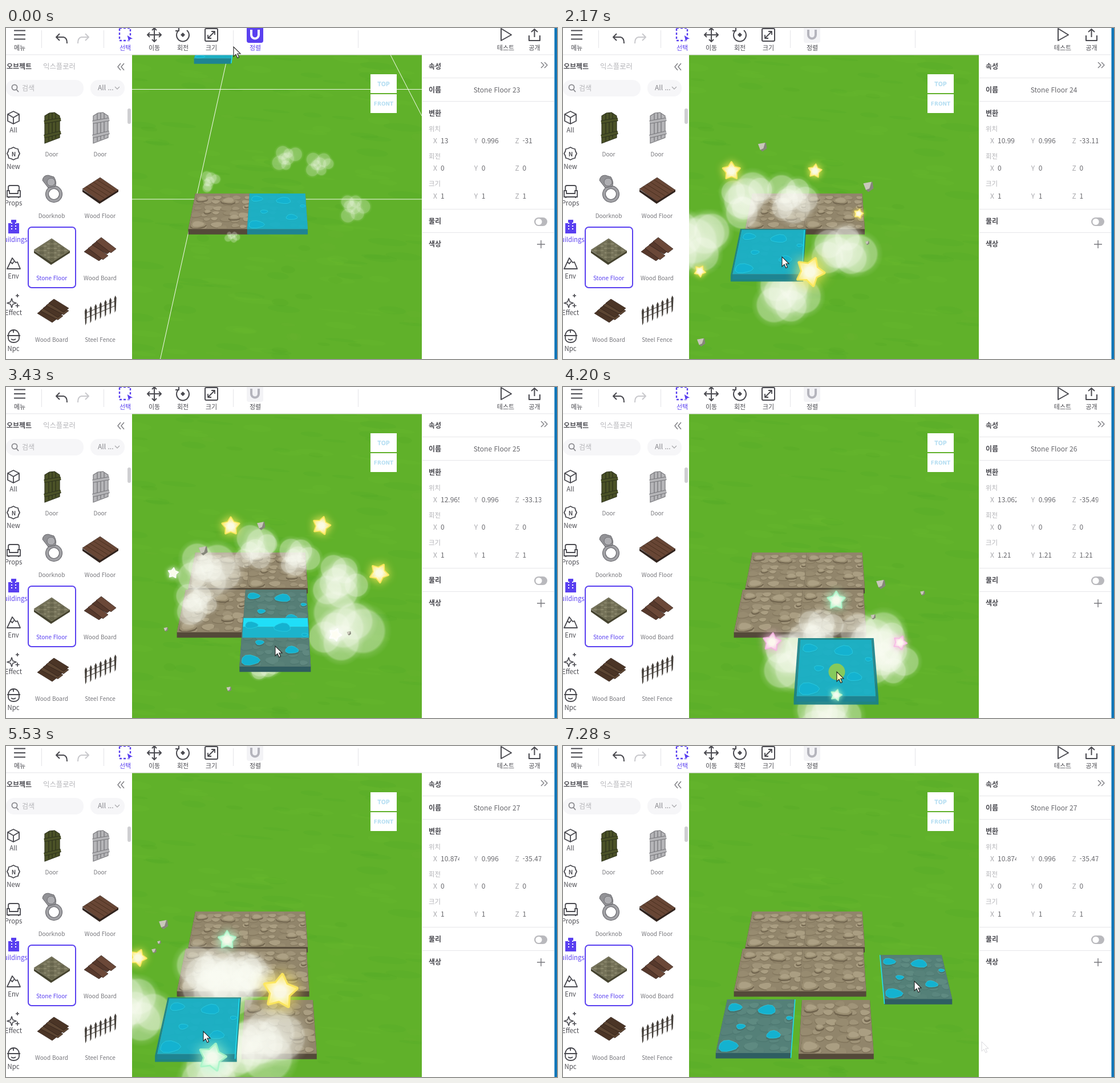
An HTML page with a canvas that plays this animation: 966 px wide and 580 px high, repeating every 7350 ms.

```html
<!DOCTYPE html>
<html lang="ko">
<head>
<meta charset="utf-8">
<title>Stone floor placement</title>
<style>
html,body{margin:0;width:966px;height:580px;overflow:hidden;background:#fff}
canvas,svg{position:absolute;left:0;top:0}
text{font-family:"Noto Sans CJK KR","Noto Sans",sans-serif;white-space:pre}
</style>
</head>
<body>
<canvas id="scene" width="966" height="580"></canvas>
<svg id="ui" width="966" height="580" viewBox="0 0 966 580"></svg>
<script>
const LOOP = 7350, STEP = 70, ALIGN_OFF = 210;
const PURPLE = '#5a40f0', DARK = '#4a4a50', GREY = '#b4b4b8';
const ctx = document.getElementById('scene').getContext('2d');
const ui = document.getElementById('ui');

let seed = 7;
const rnd = () => (seed = seed * 16807 % 2147483647) / 2147483647;
const between = (a, b) => a + rnd() * (b - a);
const mix = (a, b, k) => a + (b - a) * k;
const clamp = n => Math.max(0, Math.min(1, n));
const repeat = (n, make) => Array.from({ length: n }, (_, i) => make(i));

// ---------- interface ----------
const out = [];
const add = s => out.push(s);
const rect = (x, y, w, h, fill, more = '') => add(`<rect x="${x}" y="${y}" width="${w}" height="${h}" fill="${fill}" ${more}/>`);
const line = (d, color = DARK, w = 2) => add(`<path d="${d}" fill="none" stroke="${color}" stroke-width="${w}" stroke-linejoin="round"/>`);
const shape = (d, fill, more = '') => add(`<path d="${d}" fill="${fill}" ${more}/>`);
const label = (x, y, s, size, fill = DARK, weight = 500, anchor = 'middle', more = '') =>
  add(`<text x="${x}" y="${y}" font-size="${size}" fill="${fill}" font-weight="${weight}" text-anchor="${anchor}" ${more}>${s}</text>`);

function toolbar() {
  rect(0, 0, 966, 47, '#fff');
  rect(0, 46.5, 961, 1, '#dcdce0');
  for (const x of [62, 171, 398, 617]) rect(x, 4, 1, 31, '#e4e4e8');
  line('M14 4.5H34M14 12H34M14 19.5H34');
  line('M94 10L88 16L94 22M88 16H101Q107 17 107 27');
  line('M139 10L145 16L139 22M145 16H132Q126 17 126 27', '#c9c9cd');
  rect(199, 0, 19, 22, 'none', `stroke="${PURPLE}" stroke-width="2.4" stroke-dasharray="4 3"`);
  shape('M212 12L223 19L218 20L215 25Z', PURPLE, 'stroke="#fff" stroke-width="1"');
  line('M260 0V24M248 12H272M256 4L260 0L264 4M256 20L260 24L264 20M252 8L248 12L252 16M268 8L272 12L268 16');
  line('M303 4A11 11 0 1 0 317 4M303 -1V5H297');
  shape('M310 8L314 12L310 16L306 12Z', DARK);
  rect(349, 1, 22, 22, 'none', `rx="2" stroke="${DARK}" stroke-width="2"`);
  line('M354 18L366 6M360 6H366V12M354 12V18H360', DARK, 1.8);
  add('<rect id="alignBox" x="422" y="-4" width="29" height="30" rx="4"/>');
  add('<path id="magnet" d="M430 3V12A6.5 6.5 0 0 0 443 12V3" fill="none" stroke-width="4"/>');
  [['메뉴', 24], ['이동', 260], ['회전', 310], ['크기', 360], ['테스트', 876], ['공개', 926.5]].forEach(([s, x]) => label(x, 39, s, 11));
  label(209, 39, '선택', 11, PURPLE);
  label(437, 39, '정렬', 11, DARK, 500, 'middle', 'id="alignText"');
  line('M868 1V22L886 12Z');
  line('M917 13V22H936V13M926.5 16V2M921 7L926.5 2L932 7');
}

function plank(x, y, w, h, c) {
  shape(`M${x} ${y}l${w} ${h}l9 -7l${-w} ${-h}z`, c, 'stroke="#2b1e18" stroke-width=".7"');
}
function slab(x, y, top, side) {
  shape(`M${x - 31} ${y}l30 20l33 -20v4l-33 21l-30 -21z`, side);
  shape(`M${x - 31} ${y - 1}l31 -20l32 22l-32 20z`, top, `stroke="${side}" stroke-width=".6"`);
}
function door(x, c, dark) {
  shape(`M${x - 13} 154l8 -5l9 -1l9 6v38l-26 10z`, c, `stroke="${dark}" stroke-width="1.2"`);
  line(`M${x - 6} 150V198M${x} 148V196M${x + 6} 150V193`, dark, 1.3);
  for (const [color, w] of [[dark, 6], [c, 4]]) line(`M${x - 14} 165l29 -5M${x - 14} 190l29 -7`, color, w);
}

function thumbnails() {
  door(81, '#4b5227', '#2d321c');
  door(166, '#b5b5b8', '#77777b');
  for (const [color, w] of [['#5c5c61', 6], ['#a2a2a6', 4]]) add(`<circle cx="84" cy="291" r="12" fill="none" stroke="${color}" stroke-width="${w}"/>`);
  shape('M64 267Q65 258 74 258L84 261Q90 271 86 278L74 280Z', '#929296', 'stroke="#66666a"');
  add('<circle cx="79" cy="270" r="7" fill="#aeaeb2" stroke="#707074"/>');
  slab(165, 283, '#684635', '#30231d');
  for (let i = 1; i < 5; i++) line(`M${134 + i * 6.4} ${282 - i * 4}l32 20`, '#49301f', 1);
  slab(80, 390, '#78755b', '#45432f');
  for (let i = 0; i < 25; i++) {
    const u = i % 5 - 2, v = (i / 5 | 0) - 2;
    add(`<ellipse cx="${80.5 + (u - v) * 6}" cy="${390 + (u + v) * 3.9}" rx="${between(2.6, 4)}" ry="2.2" fill="${i % 3 ? '#88856a' : '#68664e'}" stroke="#5b5843" stroke-width=".5"/>`);
  }
  for (let i = 0; i < 4; i++) plank(137 + i * 7, 392 - i * 6, 26, 16 + i % 2 * 4, i % 2 ? '#6b4838' : '#57392c');
  for (let i = 0; i < 5; i++) plank(55 + i * 5, 500 - i * 4.5, 26 + i % 2 * 5, 16, i % 2 ? '#5c4532' : '#4b3526');
  line('M138 500L193 478M138 509L193 486', '#57514b', 1.3);
  for (let i = 0; i < 7; i++) shape(`M${138 + i * 8.6} ${496 - i * 3.7}l2 -5l2 4l-1 22l-2 4z`, '#46413c');
}

function leftPanel() {
  rect(0, 47.5, 221, 533, '#fff');
  label(1, 72, '오브젝트', 12, DARK, 700, 'start');
  label(65, 72, '익스플로러', 12.4, GREY, 500, 'start');
  line('M201 62L196 68L201 74M207 62L202 68L207 74', '#77777c', 1.3);
  rect(0, 91, 136, 29, '#f6f6f8', 'rx="14"');
  rect(148, 91, 60, 29, '#f6f6f8', 'rx="14"');
  add('<circle cx="15" cy="104" r="4.6" fill="none" stroke="#88888d" stroke-width="1.8"/>');
  line('M18.5 108L22 112', '#88888d', 1.8);
  label(28, 109.5, '검색', 12, GREY, 500, 'start');
  label(161, 109, 'All ...', 12, '#85858a', 500, 'start');
  line('M191 103L195 107L199 103', '#aaaaae', 1.3);
  rect(213, 141, 6, 27, '#cfcfd2', 'rx="3"');

  ['All', 'New', 'Props', 'Buildings', 'Env', 'Effect', 'Npc'].forEach((s, i) =>
    label(13, 183 + i * 63.9, s, 11.3, i === 3 ? PURPLE : DARK));
  line('M13 146L23 151V163L13 168L3 163V151ZM3 151L13 157L23 151M13 157V168', DARK, 1.8);
  line('M13 209l4 2l4 1l1 4l2 4l-2 4l-1 4l-4 1l-4 2l-4 -2l-4 -1l-1 -4l-2 -4l2 -4l1 -4l4 -1z', DARK, 1.8);
  label(13.5, 224.5, 'N', 10, DARK, 700);
  line('M4 285V279Q4 276 7 276H20Q23 276 23 279V285M2 285H6V290H21V285H25V296H2ZM5 296V298M22 296V298', DARK, 1.8);
  shape('M4 360V342H9V336H18V342H23V360Z', PURPLE);
  for (const y of [342, 347, 352]) line(`M9 ${y}H11M16 ${y}H18`, '#fff', 1.8);
  line('M2 422L11 403L17 411L20 410L25 422ZM8 410L11 413L14 409', DARK, 1.8);
  line('M10 474l2 6l6 2l-6 2l-2 6l-2 -6l-6 -2l6 -2zM20 466v6M17 469h6M20 483v7M16.5 486.5h7', DARK, 1.6);
  line('M4 539A9.5 10 0 0 1 23 539V544A9.5 7 0 0 1 4 544ZM2 539H25M9 545Q13 548 17 545M13 529V534', DARK, 1.8);

  rect(39, 349, 83, 106, '#fff', `rx="6" stroke="${PURPLE}" stroke-width="2"`);
  ['Door', 'Door', 'Doorknob', 'Wood Floor', 'Stone Floor', 'Wood Board', 'Wood Board', 'Steel Fence'].forEach((s, i) =>
    label(i % 2 ? 165 : 80, 225 + (i >> 1) * 108.3, s, 10, i === 4 ? PURPLE : '#77777c'));
  thumbnails();
}

function rightPanel() {
  rect(729, 47.5, 233, 533, '#fff');
  rect(961.5, 0, 5, 580, '#0f75b8');
  for (const y of [87, 128, 317, 358]) rect(730, y, 231, 1, '#e6e6e9');
  [['속성', 72], ['이름', 113], ['변환', 154], ['물리', 343], ['색상', 383]].forEach(([s, y]) => label(741, y, s, 12, DARK, 600, 'start'));
  line('M938 60L943 65L938 70M944 60L949 65L944 70', '#77777c', 1.3);
  label(860.5, 113, '', 12, '#66666b', 500, 'middle', 'id="name"');
  ['위치', '회전', '크기'].forEach((s, r) => {
    const y = 180.5 + r * 48.3;
    label(741, y, s, 11.5, GREY, 500, 'start');
    ['X', 'Y', 'Z'].forEach((axis, c) => {
      const x = 749 + c * 71.7;
      label(x, y + 21.5, axis, 12, '#a8a8ac', 400, 'start');
      add(`<svg x="${x + 13}" y="${y + 8}" width="33" height="20" overflow="hidden"><text id="v${r}${c}" y="13.5" font-size="12" font-weight="500" fill="#66666b"></text></svg>`);
    });
  });
  rect(926, 332, 23, 15, '#b9b9bd', 'rx="7.5"');
  add('<circle cx="934" cy="339.5" r="5.6" fill="#fff"/>');
  line('M931 379H945M938 372V386', '#77777c', 1.4);
}

function viewButtons() {
  const style = 'style="font-family:\'DejaVu Sans\',sans-serif"';
  rect(639, 81, 46, 33, '#fff');
  rect(639, 116, 46, 33, '#fff');
  label(662, 101.5, 'TOP', 9.6, '#b5def2', 700, 'middle', style);
  label(662, 135.5, 'FRONT', 9, '#b5def2', 700, 'middle', style);
}

toolbar(); leftPanel(); rightPanel(); viewButtons();
const ARROW = 'M0 0V17L4 13.2L6.8 19.5L9.5 18.2L6.8 12H12Z';
add(`<path id="trail" d="${ARROW}" transform="translate(734 518)" fill="#fff" stroke="#d8d8dc"/>`);
add(`<path id="cursor" d="${ARROW}" stroke="#222" stroke-width="1.1"/>`);
ui.innerHTML = out.join('');
const $ = id => document.getElementById(id);

// ---------- tiles in perspective ----------
const CX = 475, HORIZON = -422, WIDTH = .1372, DEPTH = .000113;

function tileMap({ x, y }, k = 1) {
  const s0 = y - HORIZON, left = (x - CX) / s0;
  return (u, v) => {
    const s = 1 / (1 / s0 - DEPTH * ((v - .5) * k + .5));
    return [CX + (left + ((u - .5) * k + .5) * WIDTH) * s, s + HORIZON];
  };
}
// top-left corner of the tile whose centre is at x, y
function tileAround(x, y) {
  const s = y - HORIZON, s0 = 1 / (1 / s + DEPTH / 2);
  return { x: CX + ((x - CX) / s - WIDTH / 2) * s0, y: s0 + HORIZON };
}
function poly(points) {
  ctx.beginPath();
  points.forEach(p => ctx.lineTo(p[0], p[1]));
  ctx.closePath();
}
function fillPoly(points, color) { poly(points); ctx.fillStyle = color; ctx.fill(); }
const corners = m => [m(0, 0), m(1, 0), m(1, 1), m(0, 1)];
function outline(m, h) {
  const [a, b, c, d] = corners(m);
  return [a, b, c, [c[0], c[1] + h], [d[0], d[1] + h], d];
}
const inside = n => Math.max(.01, Math.min(.99, n));
const stonePath = (m, { u, v, r }, grow = 1, dv = 0) => repeat(12, i => {
  const a = i * Math.PI / 6, w = r * grow * (1 + .1 * Math.sin(a * 3 + u * 9));
  return m(inside(u + Math.cos(a) * w), inside(v + dv + Math.sin(a) * w * .75));
});
const stone = (u, v, r) => ({ u, v, r });
const raised = [stone(.135, .16, .1), stone(.61, .21, .125), stone(.94, .37, .045),
  stone(.27, .53, .062), stone(.74, .68, .095), stone(.145, .88, .13)];
const pebbles = repeat(36, i => ({
  ...stone((i % 6 + between(.3, .8)) / 6, ((i / 6 | 0) + between(.3, .8)) / 6, between(.055, .1)),
  color: ['#978b70', '#a09479', '#aa9e82'][i * 7 % 3]
}));

const mixRgb = (a, b, k, alpha = 1) => `rgba(${a.map((n, i) => Math.round(mix(n, b[i], k)))},${alpha})`;

function drawTile(tile, glow = -1, k = 1) {
  const m = tileMap(tile, k), h = 9.5, top = corners(m), lit = glow >= 0;
  fillPoly(outline(m, h), lit ? mixRgb([48, 92, 96], [30, 132, 146], glow) : '#544939');
  fillPoly(top, '#91856b');
  for (const p of pebbles) {
    fillPoly(stonePath(m, p, 1.06, .014), '#82765d');
    fillPoly(stonePath(m, p), p.color);
  }
  for (const p of raised) {
    fillPoly(stonePath(m, p, 1.05, .03), '#71654f');
    fillPoly(stonePath(m, p), '#9b8f73');
    fillPoly(stonePath(m, p, .75, -.012), '#aca084');
  }
  if (!lit) return;
  fillPoly(top, mixRgb([45, 122, 126], [24, 178, 200], glow, mix(.58, .95, glow)));
  drawBlobs(m);
  const mid = (top[2][0] + top[3][0]) / 2;
  if (Math.abs(mid - CX) < 60) return;
  const [a, b] = mid < CX ? [top[1], top[2]] : [top[0], top[3]];
  ctx.beginPath();
  ctx.moveTo(a[0], a[1]); ctx.lineTo(b[0], b[1] + h - 1);
  ctx.strokeStyle = '#1fe0f4'; ctx.lineWidth = 1.6; ctx.stroke();
}
function drawBlobs(m) {
  for (const p of raised) {
    poly(stonePath(m, p));
    ctx.fillStyle = '#14b2d0'; ctx.fill();
    ctx.strokeStyle = 'rgba(50,215,235,.6)'; ctx.lineWidth = 1; ctx.stroke();
  }
}
// the carried tile shows through the selected one
function drawOverlap(sel, ghost) {
  const m = tileMap(ghost);
  ctx.save();
  poly(outline(tileMap(sel), 9.5)); ctx.clip();
  poly(corners(m)); ctx.clip();
  ctx.fillStyle = '#20dff8'; ctx.fillRect(221, ghost.y, 508, 16);
  ctx.fillStyle = '#1cb4cc'; ctx.fillRect(221, ghost.y + 16, 508, 60);
  drawBlobs(m);
  ctx.restore();
}

// ---------- placing bursts ----------
const point = ([x, y, r]) => ({ x, y, r });
const cloud = ([x, y, r]) => repeat(7, i => {
  const a = i * 2.4 + rnd(), d = r * .75 * Math.sqrt(i / 7);
  return { x: x + Math.cos(a) * d, y: y + Math.sin(a) * d, r: r * between(.45, .75) };
});
function burst(start, x, y, clouds, stars = [], tints = []) {
  return {
    start, x, y,
    puffs: clouds.flatMap(cloud),
    stars: stars.map((s, i) => ({ ...point(s), tint: tints[i % tints.length], turn: i * .13 })),
    rocks: stars.map(() => {
      const a = between(0, 6.28), d = between(130, 250);
      return { x: x + Math.cos(a) * d, y: y + Math.sin(a) * d * .8, r: between(3, 9) };
    })
  };
}
const YELLOW = '#ffe95c', WHITE = '#ffffff', GREEN = '#a8f5c8', PINK = '#f7b4e4';
const bursts = [
  burst(-620, 425, 325, [[494, 229, 24], [550, 238, 24], [357, 269, 18], [610, 314, 26], [397, 365, 12]]),
  burst(2100, 368, 398, [[320, 292, 44], [402, 292, 39], [225, 372, 58], [495, 385, 48], [395, 468, 46]],
    [[293, 246, 17], [444, 246, 13], [523, 323, 9], [435, 428, 27], [236, 427, 11]], [YELLOW]),
  burst(3150, 474, 395, [[355, 318, 46], [335, 375, 32], [437, 284, 36], [512, 298, 30], [588, 338, 44], [592, 422, 54], [452, 482, 28]],
    [[394, 244, 17], [293, 326, 10], [553, 243, 17], [577, 434, 12], [654, 326, 18]], [YELLOW, WHITE]),
  burst(4060, 480, 498, [[405, 470, 50], [450, 430, 42], [545, 440, 50], [572, 478, 42], [465, 574, 44]],
    [[479, 374, 17], [366, 447, 17], [479, 540, 11], [591, 448, 13]], [GREEN, PINK]),
  burst(5460, 342, 498, [[358, 392, 50], [400, 408, 56], [430, 402, 38], [222, 458, 54], [452, 520, 58], [370, 562, 56]],
    [[389, 335, 17], [485, 428, 32], [362, 547, 26], [228, 367, 16]], [GREEN, YELLOW])
];

function puff({ x, y }, r, fade) {
  const c = a => `rgba(250,252,243,${a * Math.sqrt(fade)})`;
  const g = ctx.createRadialGradient(x, y, 0, x, y, r * 1.3);
  g.addColorStop(0, c(.42)); g.addColorStop(.72, c(.38)); g.addColorStop(.8, c(.12)); g.addColorStop(1, c(0));
  ctx.fillStyle = g;
  ctx.beginPath(); ctx.arc(x, y, r * 1.3, 0, 7); ctx.fill();
}
function star({ x, y, tint, turn }, r, fade) {
  ctx.save();
  ctx.globalAlpha = fade * .9;
  ctx.shadowColor = tint; ctx.shadowBlur = r * .8;
  poly(repeat(10, i => {
    const a = i * Math.PI / 5 - Math.PI / 2 + turn, q = r * (i % 2 ? .52 : .92);
    return [x + Math.cos(a) * q, y + Math.sin(a) * q];
  }));
  ctx.lineJoin = 'round'; ctx.lineWidth = r * .2;
  ctx.strokeStyle = tint; ctx.stroke();
  const g = ctx.createRadialGradient(x, y, 0, x, y, r);
  g.addColorStop(.3, '#fffef2'); g.addColorStop(1, tint);
  ctx.fillStyle = g; ctx.fill();
  ctx.restore();
}
function rock({ x, y }, r, fade) {
  ctx.globalAlpha = fade;
  fillPoly([[x - r, y - r * .7], [x + r * .8, y - r], [x + r, y + r * .3], [x, y + r], [x - r * .5, y + r * .6]], '#86867a');
  fillPoly([[x - r, y - r * .7], [x + r * .6, y - r], [x + r * .2, y + r * .3], [x - r * .5, y + r * .6]], '#c9c8ba');
  ctx.globalAlpha = 1;
}
function drawBursts(t, kind, draw, life) {
  for (const b of bursts) {
    const age = t - b.start;
    if (age <= 0 || age >= life) continue;
    const far = 1 - Math.exp(-age / 20), fade = 1 - clamp((age - 280) / (life - 280));
    for (const p of b[kind]) {
      const at = { ...p, x: mix(b.x, p.x, far), y: mix(b.y, p.y, far) };
      draw(at, p.r * Math.min(1, age / 70) * mix(.4, 1, fade), fade);
    }
  }
}

// ---------- motion ----------
const tiles = [
  { start: 0, x: 332, y: 290 },
  { start: 0, x: 427, y: 290, px: '13', pz: '-31' },
  { start: 2100, x: 315, y: 355, px: '10.99', pz: '-33.11' },
  { start: 3150, x: 420, y: 355, px: '12.965', pz: '-33.135' },
  { start: 4060, x: 419, y: 445, px: '13.062', pz: '-35.492' },
  { start: 5460, x: 288, y: 444, px: '10.874', pz: '-35.47' }
];
const cursorPath = [[0, 399, 33], [140, 434, 18], [210, 434, 18], [490, 110, 395], [840, 380, 398], [1330, 371, 404], [2170, 384, 401],
  [3150, 474, 400], [3430, 472, 454], [4060, 480, 499], [4340, 480, 499], [5530, 346, 500], [5900, 734, 518], [6160, 632, 420],
  [6930, 616, 412], [LOOP, 616, 412]];

function cursorAt(t) {
  const i = Math.max(1, cursorPath.findIndex(k => k[0] >= t));
  const [t0, x0, y0] = cursorPath[i - 1], [t1, x1, y1] = cursorPath[i];
  const p = (t - t0) / (t1 - t0), e = p * p * (3 - 2 * p);
  return [mix(x0, x1, e), mix(y0, y1, e)];
}
function stateAt(t) {
  const placed = tiles.filter(p => t >= p.start), sel = placed[placed.length - 1], age = t - sel.start;
  const [x, y] = cursorAt(t), dropped = sel.start > 0;
  let ghost = null;
  if (t < 70) ghost = { x: 337, y: 29 };
  else if (t >= 560 && age >= 250) ghost = tileAround(x, y - 9);
  return {
    t, placed, sel, x, y, ghost,
    glow: age < 150 ? 1 : .5 + .5 * Math.cos(age / 530 * 2 * Math.PI),
    pop: dropped && age < 280 ? 1 + .12 * Math.sin(Math.PI * age / 280) : 1,
    pressed: dropped && age >= 100 && age < 150
  };
}

const grass = repeat(170, i => [between(221, 729), between(47, 580), between(10, 36), between(2, 7), i % 2]);
function drawGround(t) {
  ctx.fillStyle = '#60b12a';
  ctx.fillRect(221, 47, 508, 533);
  for (const [x, y, rx, ry, light] of grass) {
    ctx.fillStyle = light ? 'rgba(130,195,60,.06)' : 'rgba(40,130,20,.06)';
    ctx.beginPath(); ctx.ellipse(x, y, rx, ry, .1, 0, 7); ctx.fill();
  }
  if (t >= ALIGN_OFF) return;
  ctx.strokeStyle = '#f4faee'; ctx.lineWidth = 1;
  ctx.stroke(new Path2D('M221 107.5H729M221 300H729M389 47L270.5 580M674 47L729 154'));
}

function drawScene({ t, placed, sel, glow, pop, ghost, pressed, x, y }) {
  ctx.save();
  ctx.beginPath(); ctx.rect(221, 47, 508, 533); ctx.clip();
  drawGround(t);
  placed.filter(p => p !== sel).forEach(p => drawTile(p));
  drawBursts(t, 'puffs', puff, 950);
  if (pop > 1.02) fillPoly(outline(tileMap(sel, pop), 11), 'rgba(26,128,136,.92)');
  drawTile(sel, glow, mix(1, pop, .4));
  if (ghost) {
    drawTile(ghost, glow);
    if (sel.start) drawOverlap(sel, ghost);
  }
  drawBursts(t, 'stars', star, 750);
  drawBursts(t, 'rocks', rock, 750);
  if (pressed) {
    ctx.fillStyle = '#86ca5c';
    ctx.beginPath(); ctx.arc(x, y, 14.5, 0, 7); ctx.fill();
  }
  ctx.restore();
}

function drawPanel({ t, placed, sel, pressed, x, y }) {
  const on = t < ALIGN_OFF;
  $('alignBox').setAttribute('fill', on ? PURPLE : '#f3f3f6');
  $('magnet').setAttribute('stroke', on ? '#fff' : '#b5b5bd');
  $('alignText').setAttribute('fill', on ? PURPLE : DARK);
  $('name').textContent = 'Stone Floor ' + (21 + placed.length);
  [sel.px, '0.996', sel.pz].forEach((s, c) => {
    $('v0' + c).textContent = s;
    $('v1' + c).textContent = '0';
    $('v2' + c).textContent = pressed ? '1.21' : '1';
  });
  $('cursor').setAttribute('transform', `translate(${x} ${y})`);
  $('cursor').setAttribute('fill', pressed ? '#fdfab0' : '#fff');
  $('trail').setAttribute('visibility', t >= 5950 ? 'visible' : 'hidden');
}

function frame() {
  const state = stateAt(Math.floor(performance.now() % LOOP / STEP) * STEP);
  drawScene(state);
  drawPanel(state);
  requestAnimationFrame(frame);
}
frame();
</script>
</body>
</html>
```
